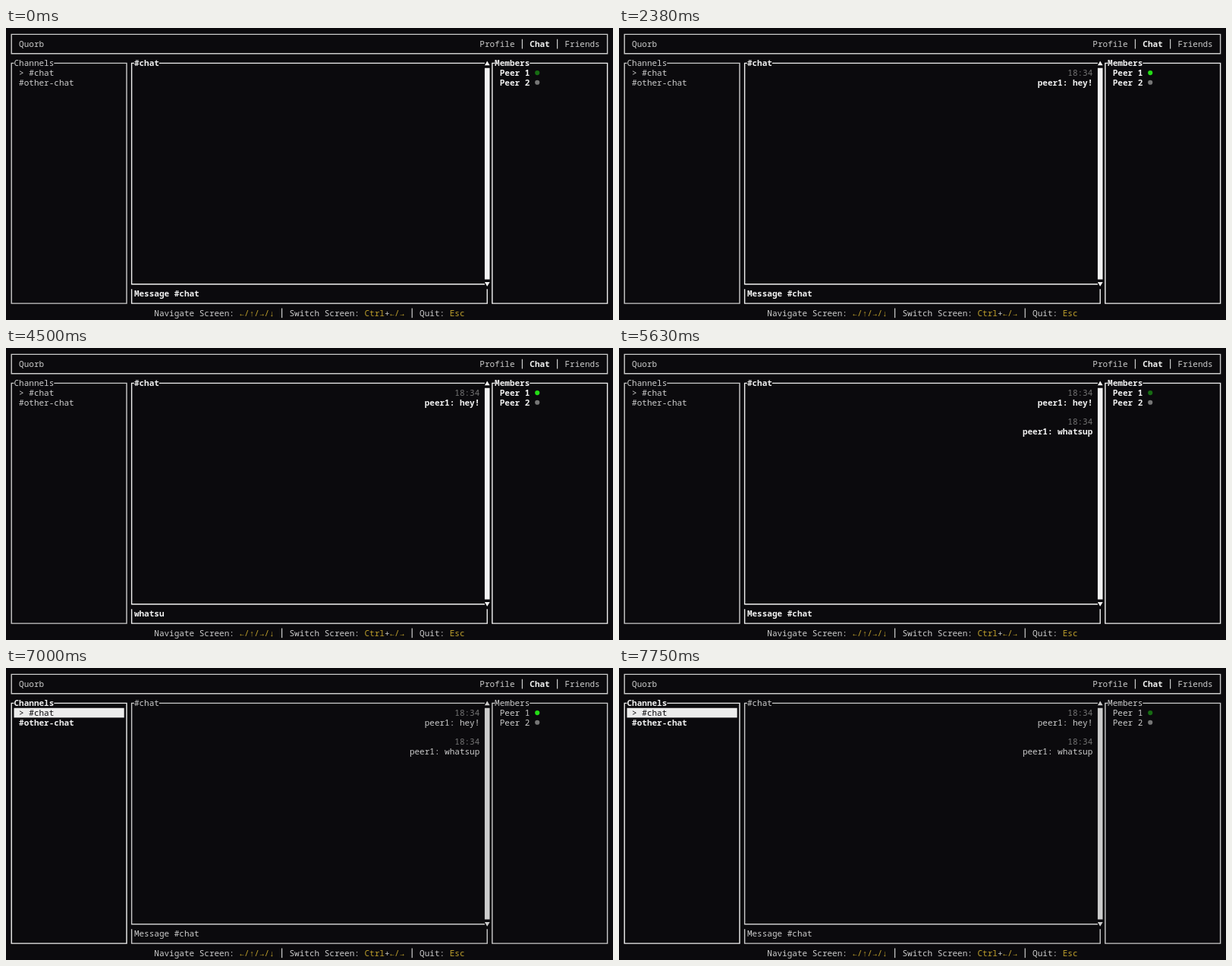
Write an HTML page with a canvas that moves like this. It is 800 px wide and 385 px high and loops after 8000 ms.

```html
<!DOCTYPE html>
<html lang="en">
<head>
<meta charset="utf-8">
<title>Terminal chat</title>
<style>
  html, body { margin: 0; width: 100%; height: 100%; overflow: hidden; background: #0b0a0d; }
  canvas { display: block; width: 800px; height: 385px; }
</style>
</head>
<body>
<canvas id="stage"></canvas>
<script>
const LOOP = 8000, WIDTH = 800, HEIGHT = 385;
const CELL_W = 6.6, CELL_H = 12.67, LINE = 1.4;
const BG = '#0b0a0d', NORMAL = '#cccccc', BRIGHT = '#f2f2f2', GREY = '#767676', YELLOW = '#bfa02c';

const canvas = document.getElementById('stage');
const ctx = canvas.getContext('2d');
const ratio = window.devicePixelRatio || 1;
canvas.width = WIDTH * ratio;
canvas.height = HEIGHT * ratio;
ctx.scale(ratio, ratio);
ctx.textAlign = 'center';

// Terminal grid: left edge and middle of a column, middle and top edge of a row.
const colLeft = col => 3.9 + col * CELL_W;
const midX = col => colLeft(col + 0.5);
const midY = row => 8.4 + row * CELL_H;
const rowTop = row => midY(row - 0.5);

const DRAFTS = [
  { keys: [[1380, 'h'], [1500, 'e'], [1630, 'y'], [1880, '!']], sent: 2130 },
  { keys: [[3500, 'w'], [3630, 'h'], [3880, 'a'], [4000, 't'], [4250, 'su'], [4630, 'p']], sent: 5130 }
];
const SWITCH_START = 6880, SWITCH_END = 7000;
const BLINK_TIMES = [130, 1250, 2250, 3380, 4500, 5630, 6750, 7750];

const typed = (draft, t) => draft.keys.filter(([at]) => t >= at).map(key => key[1]).join('');

function text(str, col, row, color = NORMAL) {
  ctx.font = `${color === BRIGHT ? 600 : 400} 11px "Noto Sans Mono", "DejaVu Sans Mono", monospace`;
  ctx.fillStyle = color;
  [...str].forEach((char, i) => {
    if (char === '│') ctx.fillRect(midX(col + i) - 0.6, rowTop(row), 1.2, CELL_H);
    else ctx.fillText(char, midX(col + i), midY(row) + 3.9);
  });
}

// Draws text runs one after another: [string, color] pairs.
function runs(parts, col, row) {
  for (const [str, color] of parts) {
    text(str, col, row, color);
    col += str.length;
  }
}

function path(color, ...points) {
  ctx.strokeStyle = color;
  ctx.lineWidth = LINE;
  ctx.beginPath();
  points.forEach(([x, y]) => ctx.lineTo(x, y));
  ctx.stroke();
}

function panel(title, col0, row0, col1, row1, color) {
  const [x0, y0, x1, y1] = [midX(col0), midY(row0), midX(col1), midY(row1)];
  path(color, [colLeft(col0 + 1), y0], [x0, y0], [x0, y1], [x1, y1], [x1, y0],
    [colLeft(col0 + 1 + title.length), y0]);
  text(title, col0 + 1, row0, color);
}

function dot(col, row, color) {
  ctx.fillStyle = color;
  ctx.beginPath();
  ctx.arc(midX(col), midY(row), 3.1, 0, Math.PI * 2);
  ctx.fill();
}

function triangle(row, direction, color) {
  const x = midX(95), y = midY(row);
  ctx.fillStyle = color;
  ctx.beginPath();
  ctx.moveTo(x - 3.4, y + 2.8 * direction);
  ctx.lineTo(x + 3.4, y + 2.8 * direction);
  ctx.lineTo(x, y - 3 * direction);
  ctx.fill();
}

function drawHeader() {
  panel('', 0, 0, 119, 2, NORMAL);
  text('Quorb', 2, 1);
  runs([['Profile │ ', NORMAL], ['Chat', BRIGHT], [' │ Friends', NORMAL]], 94, 1);
}

function drawChannels(focused) {
  const color = focused ? BRIGHT : NORMAL;
  panel('Channels', 0, 3, 23, 28, color);
  if (focused) {
    ctx.fillStyle = '#ececec';
    ctx.fillRect(colLeft(1), rowTop(4), 22 * CELL_W, CELL_H);
  }
  text('> #chat', 2, 4, focused ? BG : NORMAL);
  text('#other-chat', 2, 5, color);
}

function drawChat(t, color) {
  const x0 = midX(24), x1 = midX(95), barX = colLeft(95);
  path(color, [colLeft(25), midY(3)], [x0, midY(3)], [x0, midY(26)], [barX, midY(26)]);
  path(color, [colLeft(30), midY(3)], [barX, midY(3)]);
  path(color, [x0, rowTop(27)], [x0, midY(28)], [x1, midY(28)], [x1, rowTop(27)]);
  text('#chat', 25, 3, color);

  triangle(3, 1, color);
  triangle(26, -1, color);
  ctx.fillStyle = color;
  ctx.fillRect(barX, rowTop(4), CELL_W, 22 * CELL_H);

  DRAFTS.forEach((draft, i) => {
    if (t < draft.sent) return;
    const message = 'peer1: ' + typed(draft, t);
    text('18:34', 89, 4 + 3 * i, GREY);
    text(message, 94 - message.length, 5 + 3 * i, color);
  });

  const draft = DRAFTS.find(d => t < d.sent);
  text((draft && typed(draft, t)) || 'Message #chat', 25, 27, color);
}

function drawMembers(t, color) {
  const lit = BLINK_TIMES.filter(at => t >= at).length % 2;
  panel('Members', 96, 3, 119, 28, color);
  text('Peer 1', 98, 4, color);
  text('Peer 2', 98, 5, color);
  dot(105, 4, lit ? '#24dc16' : '#176c13');
  dot(105, 5, GREY);
}

function drawFooter() {
  runs([
    ['Navigate Screen: ', NORMAL], ['←/↑/→/↓', YELLOW],
    [' │ Switch Screen: ', NORMAL], ['Ctrl', YELLOW], ['+', NORMAL], ['←/→', YELLOW],
    [' │ Quit: ', NORMAL], ['Esc', YELLOW]
  ], 29, 29);
}

function drawScreen(t, channelsFocused) {
  const color = channelsFocused ? NORMAL : BRIGHT;
  ctx.fillStyle = BG;
  ctx.fillRect(0, 0, WIDTH, HEIGHT);
  drawHeader();
  drawChannels(channelsFocused);
  drawChat(t, color);
  drawMembers(t, color);
  drawFooter();
}

function render(t) {
  drawScreen(t, t >= SWITCH_END);
  // While focus moves, only the upper rows have been repainted.
  if (t >= SWITCH_START && t < SWITCH_END) {
    ctx.save();
    ctx.beginPath();
    ctx.rect(0, 0, WIDTH, rowTop(8));
    ctx.clip();
    drawScreen(t, true);
    ctx.restore();
  }
}

const startTime = performance.now();
function tick() {
  render((performance.now() - startTime) % LOOP);
  requestAnimationFrame(tick);
}
tick();
</script>
</body>
</html>
```
